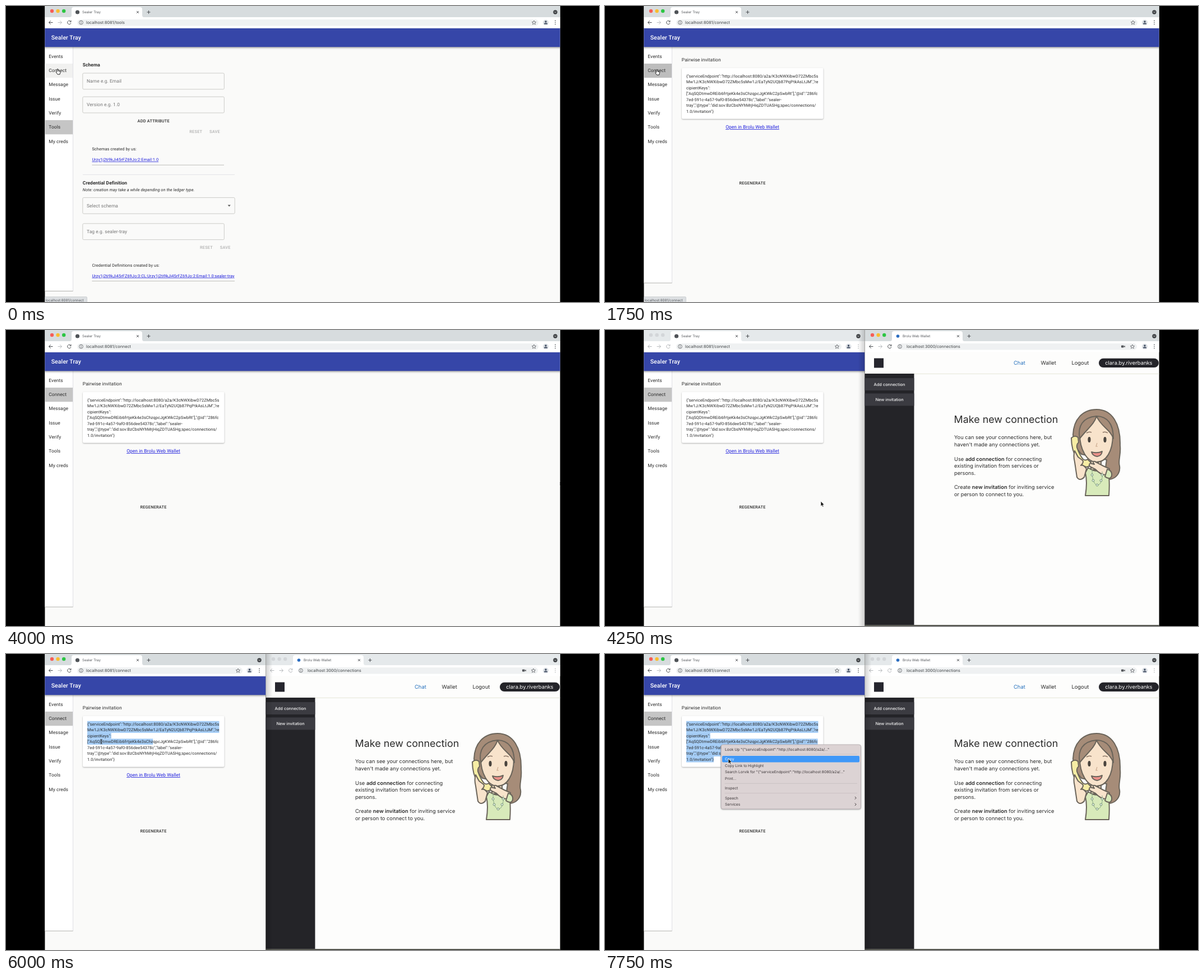
An HTML page that plays this animation: 1058 by 529 pixels, repeating every 8000 ms.

```html
<!DOCTYPE html>
<html lang="en">
<head>
<meta charset="utf-8">
<title>Connection demo</title>
<style>
html, body { margin: 0; width: 100%; height: 100%; overflow: hidden; background: #000; }
svg { display: block; width: 100%; height: 100%; }
text { text-rendering: geometricPrecision; white-space: pre; fill: #2b2b2b; }
.b1 { font: 8.42px Roboto, sans-serif; letter-spacing: .00938em; }
.b2 { font: 7.36px Roboto, sans-serif; letter-spacing: .01071em; }
.bold { font-weight: 700; }
.it { font-style: italic; }
.hint { fill: #767676; }
.btn { font: 500 7.36px Roboto, sans-serif; letter-spacing: .02857em; }
.off { fill: #b2b2b2; }
.link { fill: #1c1cdc; text-decoration: underline; }
.h6 { font: 500 10.52px Roboto, sans-serif; letter-spacing: .0075em; fill: #fff; }
.url { font: 7.25px Inter, sans-serif; fill: #3c4043; }
.tab { font: 6.15px Inter, sans-serif; fill: #55585c; }
.menu { font: 6.65px Inter, sans-serif; fill: #3a3436; }
.nav { font: 9.4px Inter, sans-serif; }
.side { font: 500 7.4px Inter, sans-serif; fill: #f4f4f4; }
.title { font: 17.9px Inter, sans-serif; }
.body { font: 9.3px Inter, sans-serif; }
.body tspan { font-weight: 600; }
.mid { text-anchor: middle; }
.on { fill: #fff; }
.blue { fill: #2470bd; }
</style>
</head>
<body>
<svg id="stage" viewBox="0 0 1058 529" xmlns="http://www.w3.org/2000/svg"></svg>
<script>
const LOOP = 8000, STEP = 250;
const APP = 'Sealer Tray', TAG = 'sealer-tray', WALLET = 'Brolu Web Wallet';
const stage = document.getElementById('stage');

const text = (x, y, s, cls) => `<text x="${x}" y="${y}" class="${cls}">${s}</text>`;
const rect = (x, y, w, h, fill, more = '') =>
  `<rect x="${x}" y="${y}" width="${w}" height="${h}" fill="${fill}" ${more}/>`;
const circle = (x, y, r, fill, more = '') =>
  `<circle cx="${x}" cy="${y}" r="${r}" fill="${fill}" ${more}/>`;
const line = (d, stroke, w = 1, more = '') =>
  `<path d="${d}" fill="none" stroke="${stroke}" stroke-width="${w}" ${more}/>`;
const rule = (x1, x2, y, color, w = .7) => line(`M${x1} ${y}H${x2}`, color, w);

const DEFS = `<defs>
  <filter id="soft" x="-10%" y="-20%" width="120%" height="150%" color-interpolation-filters="sRGB">
    <feDropShadow dx="0" dy="1" stdDeviation="1" flood-opacity=".3"/></filter>
  <filter id="bar" x="-2%" y="-20%" width="104%" height="150%" color-interpolation-filters="sRGB">
    <feDropShadow dx="0" dy="1.6" stdDeviation="1.6" flood-opacity=".36"/></filter>
  <linearGradient id="edge"><stop offset="0" stop-opacity="0"/><stop offset="1" stop-opacity=".18"/></linearGradient>
  <clipPath id="screen"><path d="M69.4 0H988.6V529H69.4z"/></clipPath>
  <clipPath id="half"><path d="M69 0H463.5V529H69z"/></clipPath>
</defs>`;

// Browser frame between x and right
function browser(x, right, title, url, active, wallet) {
  const ink = active ? '#484b4f' : '#b4b7ba';
  const lights = active ? ['#f65e57', '#f9bd2f', '#2cc643'] : ['#d3d6d9', '#d3d6d9', '#d3d6d9'];
  const infoX = wallet ? 526 : 134, starX = right - (wallet ? 48 : right > 900 ? 47 : 49.5);
  const dotX = right - (right > 900 ? 9 : 11.5), userX = right - (right > 900 ? 26 : 29);
  let s = rect(x, 0, right - x, 21, active ? '#d7dcde' : '#e5e9eb');
  s += rect(x, 20, right - x, 19.6, '#fff');
  s += `<path d="M${x + 45} 20Q${x + 48} 20 ${x + 48} 16V6Q${x + 48} 2 ${x + 52} 2H${x + 170}Q${x + 174} 2 ${x + 174} 6V16Q${x + 174} 20 ${x + 177} 20z" fill="#fff"/>`;
  s += lights.map((c, i) => circle(x + 13 + 10.6 * i, 9, 3.2, c)).join('');
  s += circle(x + 58.5, 11, wallet ? 2.8 : 3.6, wallet ? '#2a6cc0' : '#4f5357');
  s += text(x + 67, 13.3, title, 'tab');
  s += line(`M${x + 164} 9l4 4m0-4l-4 4`, '#4a4d51', .9);
  s += line(`M${x + 182.5} 11h6m-3-3v6`, '#4a4d51', 1);
  s += circle(dotX, 11, 3.7, '#3f4245') + line(`M${dotX - 1.6} 10.2l1.6 1.6 1.6-1.6`, '#fff', .8);
  s += rect(x + 58, 24, starX + 8 - x - 58, 11.5, '#eff1f2', 'rx="5.7"');
  s += line(`M${x + 14.5} 29.5h-7m3.2-3.2l-3.2 3.2 3.2 3.2`, ink, 1);
  s += line(`M${x + 23.5} 29.5h7m-3.2-3.2l3.2 3.2-3.2 3.2`, '#b9bcbf', 1);
  s += line(`M${x + 46.3} 27.4a3.2 3.2 0 1 0 .6 3M${x + 47} 25.8v2.5h-2.5`, ink, 1);
  s += circle(infoX, 29.5, 3.4, 'none', 'stroke="#55585c" stroke-width=".8"');
  s += line(`M${infoX} 29v2.3m0-4.1v1`, '#55585c', .9);
  s += text(x + 74, 32.1, url, 'url');
  if (wallet) s += rect(921, 27.4, 4.6, 4.2, '#55585c', 'rx=".8"') + '<path d="M925.5 29.5l2.4-1.8v3.6z" fill="#55585c"/>';
  s += line(`M${starX} 26l1.1 2.4 2.6.2-2 1.7.7 2.6-2.4-1.4-2.4 1.4.7-2.6-2-1.7 2.6-.2z`, '#5b5e62', .8);
  s += circle(userX, 29.5, 5, '#dce0e5') + circle(userX, 27.9, 1.7, '#3f4b60') +
    `<path d="M${userX - 3.2} 32.6q0-2.4 3.2-2.4t3.2 2.4z" fill="#3f4b60"/>`;
  return s + [26.4, 29.5, 32.6].map(y => circle(dotX, y, .8, ink)).join('');
}

function sidebar(selected, hover, bottom) {
  const items = ['Events', 'Connect', 'Message', 'Issue', 'Verify', 'Tools', 'My creds'];
  let s = rect(69, 73, 50.5, bottom - 73, '#fff') +
    line(`M119.5 73V${bottom}`, '#d9d9df', .8) + rule(69, 119.5, bottom, '#a9a9a4', .9);
  items.forEach((name, i) => {
    const top = 77.7 + 25.27 * i, on = i === selected;
    if (on || i === hover) s += rect(69, top, 50, 25.3, on ? (i === hover ? '#bdbdbd' : '#c5c5c5') : '#f1f1f0');
    s += text(76.3, top + 15.2, name, 'b1');
  });
  return s;
}

const field = (y, label, w = 252.5) =>
  rect(136.8, y, w, 28.8, 'none', 'rx="2" stroke="#c0c0bc" stroke-width=".8"') +
  text(144, y + 17.2, label, 'b1 hint');

function toolsPage() {
  const id = 'Urzy1j2ti9kJi45rFZ69Jo', schema = id + ':2:Email:1.0';
  return text(136.8, 107.6, 'Schema', 'b1 bold') +
    field(120, 'Name e.g. Email') + field(162.2, 'Version e.g. 1.0') +
    text(263.2, 207.6, 'ADD ATTRIBUTE', 'btn mid') +
    text(327.3, 226.6, 'RESET', 'btn off') + text(363, 226.6, 'SAVE', 'btn off') +
    text(153.4, 258.2, 'Schemas created by us:', 'b2') +
    text(153.4, 277.1, schema, 'b2 link') + rule(153.4, 389, 284.2, '#a5a5a0') +
    rule(137, 408, 301.4, '#dcdce0') +
    text(136.8, 319.4, 'Credential Definition', 'b1 bold') +
    text(136.8, 330.9, 'Note: creation may take a while depending on the ledger type.', 'b2 it') +
    field(342.4, 'Select schema', 271.4) + '<path d="M395.6 355.6h5.2l-2.6 2.8z" fill="#555"/>' +
    field(388.8, 'Tag e.g. ' + TAG) +
    text(346, 434.2, 'RESET', 'btn off') + text(381.8, 434.2, 'SAVE', 'btn off') +
    text(153.4, 465.8, 'Credential Definitions created by us:', 'b2') +
    text(153.4, 484.7, `${id}:3:CL:${schema}:${TAG}`, 'b2 link') + rule(153.4, 408, 491.6, '#a5a5a0');
}

const INVITE = [
  '{"serviceEndpoint":"http://localhost:8080/a2a/K3cNWXibwD72ZMbc5s',
  'Mw1J/K3cNWXibwD72ZMbc5sMw1J/EaTyN2UQb87PqPtkAsLtJM","re',
  'cipientKeys":',
  '["AqSQDtmwDREib6frtjeKk4e3sChzqpcJgKWkC2pSwbRt"],"@id":"286fc',
  '7ed-591c-4a57-9af0-856dee54378c","label":"sealer-',
  'tray","@type":"did:sov:BzCbsNYhMrjHiqZDTUASHg;spec/connections/',
  '1.0/invitation"}'
];
stage.innerHTML = INVITE.map(s => text(0, 0, s, 'b2')).join('');
const widths = [...stage.children].map(el => el.getComputedTextLength());

// picked: number of selected lines, the last one partly
function connectPage(picked) {
  let s = text(136.8, 99.3, 'Pairwise invitation', 'b1') +
    rect(137, 110.7, 252.5, 91, '#fff', 'rx="2" filter="url(#soft)"');
  INVITE.forEach((row, i) => {
    const part = Math.max(0, Math.min(1, picked - i)), y = 127.7 + 10.53 * i;
    if (part) s += rect(145, y - 7.9, widths[i] * part, 10.6, '#a5cdf6');
    s += text(145, y, row, 'b2');
  });
  return s + text(263, 219.2, `Open in ${WALLET}`, 'b1 link mid') +
    text(263, 319.2, 'REGENERATE', 'btn mid');
}

function caller() {
  const ink = 'stroke="#6a645a" stroke-width="2" stroke-linejoin="round" stroke-linecap="round"';
  const shape = (d, fill) => `<path d="${d}" fill="${fill}" ${ink}/>`;
  const skin = '#f8e3cb', hair = '#a68c78', dress = '#d8eaba';
  return shape('M877 142C852 142 836 160 835 187C836 200 840 212 850 222L895 232C892 248 893 262 900 267C911 266 920 256 918 243C915 233 921 222 919 206C920 168 905 142 877 142z', hair) +
    shape('M867 230h18v20h-18z', skin) +
    shape('M862 246Q878 258 893 246Q902 254 899 296H857Q861 272 857 255z', dress) +
    shape('M847 186C847 166 858 156 877 156C897 156 906 168 906 188C906 217 894 236 877 236C860 236 847 214 847 186z', skin) +
    shape('M847 194C843 172 852 156 877 154C873 168 861 176 847 194z', hair) +
    shape('M877 154C896 154 907 168 907 194C902 178 884 172 877 154z', hair) +
    '<ellipse cx="864" cy="196" rx="2.6" ry="5" fill="#4a443e"/><ellipse cx="892" cy="196" rx="2.6" ry="5" fill="#4a443e"/>' +
    line('M859 184q5-3 9-1m20 0q5-2 9 1', '#8d7767', 1.5) +
    line('M878 202l-2 6h3', '#c9a88c', 1.1) +
    shape('M868 218Q878 221 887 217Q886 225 878 226Q870 225 868 218z', '#ec9189') +
    shape('M832 193Q838 187 844 192L845 201Q841 204 842 210Q847 224 853 231Q857 234 861 231L867 237Q866 244 859 245Q849 242 842 231Q832 214 832 193z', '#f6eda4') +
    shape('M838 216Q835 224 838 236L842 263Q847 271 855 263L859 248Q853 240 849 242Q855 236 852 233L844 227z', skin) +
    shape('M900 258Q887 262 875 249L865 244Q862 237 869 239L873 240Q868 234 874 235L889 243L900 248z', skin) +
    shape('M896 249Q905 251 904 260Q902 269 892 262z', dress) +
    line('M869 248Q868 273 878 278Q889 275 887 253', '#8aa888', 1) +
    [[869, 259], [871, 269], [878, 277], [885, 269], [887, 259]].map(p => circle(...p, 2, '#e6f1df', 'stroke="#5f7f68" stroke-width=".8"')).join('');
}

function walletWindow(active) {
  const copy = [[195, 'You can see your connections here, but'], [208, "haven't made any connections yet."],
    [233.5, 'Use <tspan>add connection</tspan> for connecting'], [246, 'existing invitation from services or'], [258.6, 'persons.'],
    [284, 'Create <tspan>new invitation</tspan> for inviting service'], [296.7, 'or person to connect to you.']];
  let s = rect(463.5, 0, 525.5, 529, '#fdfdfc') +
    browser(464, 989, WALLET, 'localhost:3000/connections', active, true) +
    rule(463.5, 989, 78.3, '#e4e5d8', 1) + rect(480, 50.5, 17, 17, '#26262e') +
    text(729, 62.2, 'Chat', 'nav blue') + text(777.6, 62.2, 'Wallet', 'nav') + text(832.4, 62.2, 'Logout', 'nav') +
    rect(881, 50.8, 107, 16.2, '#242429', 'rx="8.1"') +
    text(934.4, 62.2, 'clara.by.riverbanks', 'nav mid on') +
    rect(463.5, 78, 88, 449, '#242428');
  [[86, 'Add connection'], [113.4, 'New invitation']].forEach(([y, name]) => {
    s += rect(463.5, y, 88, 22, '#3b3b41') + text(507.5, y + 13.7, name, 'side mid');
  });
  s += text(622.6, 166.3, 'Make new connection', 'title');
  s += copy.map(([y, row]) => text(623, y, row, 'body')).join('');
  s += caller() + rect(463.5, 527.2, 525.5, 1.8, '#45463f');
  // the window in front shades its neighbour
  const flip = active ? '' : 'transform="translate(927 0) scale(-1 1)"';
  return s + rect(451.5, 0, 12, 529, 'url(#edge)', flip);
}

function menu(copyOn) {
  const quote = '"{"serviceEndpoint":"http://localhost:8080/a2a/..."';
  const items = [[172.7, 'Look Up ' + quote], [190, 'Copy'], [201.7, 'Copy Link to Highlight'],
    [213.4, 'Search Lorvik for ' + quote], [224.8, 'Print...'], [242.3, 'Inspect'], [259.7, 'Speech'], [271.2, 'Services']];
  let s = rect(207, 162, 249.5, 115, '#dcd3d4', 'rx="3.5" stroke="#aaa3a6" stroke-width=".7" filter="url(#soft)"');
  s += [179, 231.3, 248.7].map(y => rule(213.5, 450, y, '#c3babd')).join('');
  if (copyOn) s += rect(209, 182, 245, 11.4, '#3f98f8', 'rx="2"');
  s += items.map(([y, name], i) => text(214, y, name, copyOn && i === 1 ? 'menu on' : 'menu')).join('');
  return s + [257.3, 268.8].map(y => line(`M445.8 ${y - 2.3}l2.3 2.3-2.3 2.3`, '#3a3436', 1)).join('');
}

const POINTERS = {
  arrow: '<path d="M0 0V9L2.1 7.2 3.5 10.3 5 9.6 3.6 6.6H6.3z" fill="#111" stroke="#fff" stroke-width=".7"/>',
  hand: '<path d="M-1 0Q0-1 1 0L1.2 3 4.2 3.7Q5 4 4.8 6L4 9.2H0L-2.6 5.6Q-2.6 4.5-1.2 5z" fill="#fff" stroke="#111" stroke-width=".9"/>',
  beam: line('M-1.7-4Q0-4 0-3V3Q0 4-1.7 4M1.7-4Q0-4 0-3M0 3Q0 4 1.7 4', '#222', .9)
};
const PATH = [
  [0, 92, 113, 'hand'], [1750, 92.5, 114, 'hand'], [2250, 92.5, 114, 'hand'], [2500, 180, 130, 'arrow'],
  [3500, 988, 270, 'arrow'], [4000, 988, 270, 'arrow'], [4250, 385, 306, 'arrow'], [5000, 147, 130, 'arrow'],
  [5250, 147, 130, 'arrow'], [5500, 145, 125, 'beam'], [6500, 195, 188, 'beam'], [7000, 206, 164, 'beam'],
  [7500, 207, 163, 'arrow'], [7750, 220, 187, 'arrow'], [LOOP, 220, 187, 'arrow']
];

function pointer(t) {
  const i = PATH.findIndex((p, n) => t < PATH[n + 1][0]);
  const [t0, x0, y0, kind] = PATH[i], [t1, x1, y1] = PATH[i + 1];
  const u = (t - t0) / (t1 - t0), k = u * u * (3 - 2 * u);
  return `<g transform="translate(${x0 + (x1 - x0) * k} ${y0 + (y1 - y0) * k})">${POINTERS[kind]}</g>`;
}

function scene(t) {
  const tools = t < 500, split = t >= 4250, leftOn = !split || t >= 4750, hover = t < 2500;
  const right = split ? 463.5 : 989, picked = 7 * Math.max(0, Math.min(1, (t - 5500) / 1000));
  let s = rect(69, 0, right - 69, 529, '#fafaf9');
  s += sidebar(tools ? 5 : 1, hover ? 1 : -1, tools ? 509.5 : 495);
  s += tools ? toolsPage() : connectPage(picked);
  // the bar runs past the clip so its shadow has no side edges
  s += rect(59, 39.6, right - 49, 33.6, '#3646a8', 'filter="url(#bar)"') + text(80.7, 60.2, APP, 'h6');
  s += browser(69, right, APP, 'localhost:8081/' + (tools ? 'tools' : 'connect'), leftOn);
  if (hover) s += rect(69, 519.7, 75.5, 10, '#dcdfe2', 'rx="1.5" stroke="#b9bcc0" stroke-width=".6"') +
    text(70.8, 527.6, 'localhost:8081/connect', 'tab');
  if (split) s = `<g clip-path="url(#half)">${s}</g>` + walletWindow(!leftOn);
  if (t >= 7500) s += menu(t >= 7750);
  return DEFS + rect(0, 0, 1058, 529, '#000') + `<g clip-path="url(#screen)">${s}${pointer(t)}</g>`;
}

const start = performance.now();
let shown = -1;
function tick() {
  const t = Math.floor((performance.now() - start) % LOOP / STEP) * STEP;
  if (t !== shown) stage.innerHTML = scene(shown = t);
  requestAnimationFrame(tick);
}
tick();
</script>
</body>
</html>
```
